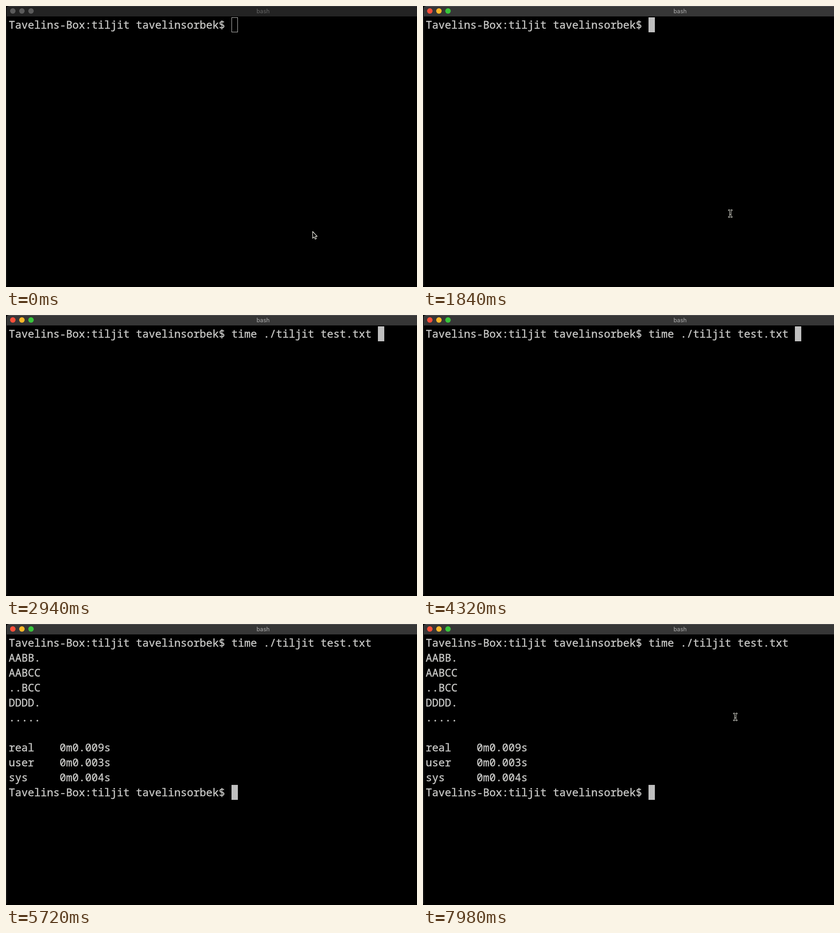
Recreate the animation shown at these times as an HTML page. Size 904 by 620 pixels, loop 8000 ms.

```html
<!DOCTYPE html>
<html lang="en">
<head>
<meta charset="utf-8">
<title>Terminal</title>
<style>
  html, body { margin: 0; width: 100%; height: 100%; overflow: hidden; background: #000; }
  svg { display: block; width: 904px; height: 620px; }

  .term text {
    font: 23.333px "Noto Sans Mono", "DejaVu Sans Mono", monospace;
    fill: #c8c8c6; stroke: #c8c8c6; stroke-width: .45px; white-space: pre;
  }
  .title { font: 12.6px Inter, Roboto, sans-serif; text-anchor: middle; }
  .pointer { stroke-linejoin: round; stroke: #f0f0e6; fill: #000; }

  /* hard switches */
  .off, .on, .cmd, .out, .caret, .ibeam { animation: 8s step-end infinite; }
  .off { animation-name: off; }
  .on { animation-name: on; }
  .cmd { animation-name: cmd; }
  .out { animation-name: out; }
  .caret { animation-name: caret; }
  .ibeam { animation-name: ibeam; }

  /* pointer paths */
  .arrow-path { animation: arrow-path 8s linear infinite; }
  .ibeam-path { animation: ibeam-path 8s linear infinite; }

  @keyframes off { 0% { visibility: visible } 4.25%, 100% { visibility: hidden } }
  @keyframes on { 0% { visibility: hidden } 4.25%, 100% { visibility: visible } }
  @keyframes cmd { 0% { visibility: hidden } 31.25%, 100% { visibility: visible } }
  @keyframes out { 0% { visibility: hidden } 55.25%, 100% { visibility: visible } }
  @keyframes caret {
    0% { transform: translate(496px, 25px) }
    31.25% { transform: translate(818px, 25px) }
    55.25%, 100% { transform: translate(496px, 355px) }
  }
  @keyframes ibeam {
    0% { visibility: hidden }
    4.25% { visibility: visible }
    30% { visibility: hidden }
    94.5%, 100% { visibility: visible }
  }
  @keyframes arrow-path {
    0%, .25% { transform: translate(674px, 497px); animation-timing-function: ease-in }
    4.25%, 100% { transform: translate(675px, 474px) }
  }
  @keyframes ibeam-path {
    0%, 4.25% { transform: translate(676px, 482px); animation-timing-function: ease-out }
    8.5%, 30% { transform: translate(676px, 458px) }
    94.5% { transform: translate(676px, 457px); animation-timing-function: ease-in-out }
    99.7%, 100% { transform: translate(687px, 205px) }
  }
</style>
</head>
<body>
<svg viewBox="0 0 904 620">
  <defs>
    <path id="bar" d="M1 23V6Q1 0 7 0H904V23Z"/>
    <g id="lights">
      <circle cx="15" cy="11" r="6"/>
      <circle cx="35" cy="11" r="6"/>
      <circle cx="55" cy="11" r="6"/>
    </g>
  </defs>
  <rect width="904" height="620"/>

  <g class="off">
    <path d="M1.5 23V617" stroke="#242424"/>
    <use href="#bar" fill="#232323"/>
    <path d="M6 .5H904" stroke="#444448"/>
    <use href="#lights" fill="#5b5b5b"/>
    <text class="title" x="565.5" y="16" fill="#646464">bash</text>
    <rect x="496.5" y="25.5" width="13" height="32" fill="none" stroke="#c4c4c2"/>
  </g>

  <g class="on">
    <path d="M1.5 23V617" stroke="#2e2e2e"/>
    <use href="#bar" fill="#363636"/>
    <path d="M6 .5H904" stroke="#5e5e64"/>
    <circle cx="15" cy="11" r="6" fill="#fa4f3a"/>
    <circle cx="35" cy="11" r="6" fill="#fbb82a"/>
    <circle cx="55" cy="11" r="6" fill="#38c63c"/>
    <text class="title" x="565.5" y="16" fill="#acacac">bash</text>
    <rect class="caret" width="14" height="33" fill="#bfbfbf"/>
  </g>

  <g class="term">
    <text x="6" y="50">Tavelins-Box:tiljit tavelinsorbek$</text>
    <text class="cmd" x="496" y="50">time ./tiljit test.txt</text>
    <g class="out">
      <text x="6" y="83">AABB.</text>
      <text x="6" y="116">AABCC</text>
      <text x="6" y="149">..BCC</text>
      <text x="6" y="182">DDDD.</text>
      <text x="6" y="215">.....</text>
      <text x="6" y="281">real    0m0.009s</text>
      <text x="6" y="314">user    0m0.003s</text>
      <text x="6" y="347">sys     0m0.004s</text>
      <text x="6" y="380">Tavelins-Box:tiljit tavelinsorbek$</text>
    </g>
  </g>

  <g class="pointer">
    <g class="off"><g class="arrow-path">
      <path d="M.5 .5V15.5L3.8 12.4L6 17.5L8.6 16.4L6.4 11.3H10.5Z" stroke-width="1.2"/>
    </g></g>
    <g class="ibeam"><g class="ibeam-path">
      <path d="M-4 -8.5H-2L0 -7L2 -8.5H4V-6.5H2.5L1.5 -5V5L2.5 6.5H4V8.5H2L0 7L-2 8.5H-4V6.5H-2.5L-1.5 5V-5L-2.5 -6.5H-4Z"/>
      <path d="M-1.5 2H1.5"/>
    </g></g>
  </g>
</svg>
</body>
</html>
```
